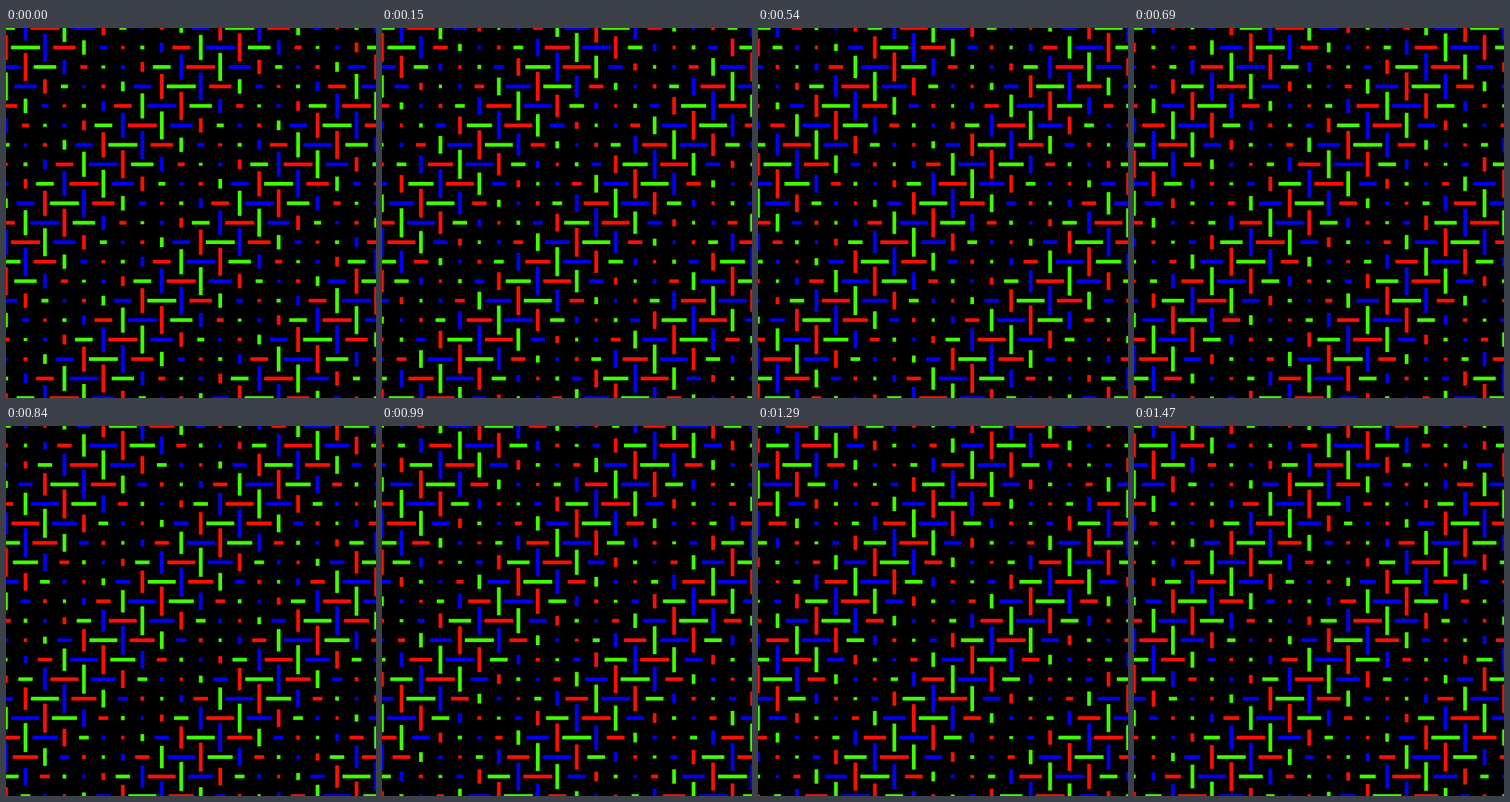
Write an HTML page with a canvas that moves like this. It is 500x500 px and loops after 1500 ms.

```html
<!DOCTYPE html>
<html>
<head>
<meta charset="utf-8">
<style>
  html, body { margin: 0; width: 100%; height: 100%; overflow: hidden; background: #000; }
  canvas { display: block; }
</style>
</head>
<body>
<canvas id="stage" width="500" height="500"></canvas>
<script>
const ctx = document.getElementById('stage').getContext('2d');
const SIZE = 500, CELLS = 19, STEP = SIZE / CELLS;
const LOOP = 1500, TICK = 30, TICKS = LOOP / TICK;
const THICK = 5, MEAN = 21.7, SWING = 17.8;
const COLORS = ['#40ff00', '#0000ff', '#ff1000'];

function draw(now) {
  const turn = (Math.floor(now % LOOP / TICK) + 1) / TICKS;
  ctx.fillStyle = '#000';
  ctx.fillRect(0, 0, SIZE, SIZE);
  for (let row = 0; row <= CELLS; row++) {
    for (let col = 0; col <= CELLS; col++) {
      // The wave runs along the diagonal, one period every ten cells
      const length = MEAN + SWING * Math.sin(2 * Math.PI * ((col + row) / 10 + turn));
      const [w, h] = (col + row) % 2 ? [THICK, length] : [length, THICK];
      ctx.fillStyle = COLORS[(col + 2 * row) % 3];
      ctx.fillRect(col * STEP - w / 2, row * STEP - h / 2, w, h);
    }
  }
}

function loop() {
  draw(performance.now());
  requestAnimationFrame(loop);
}
loop();
</script>
</body>
</html>
```
